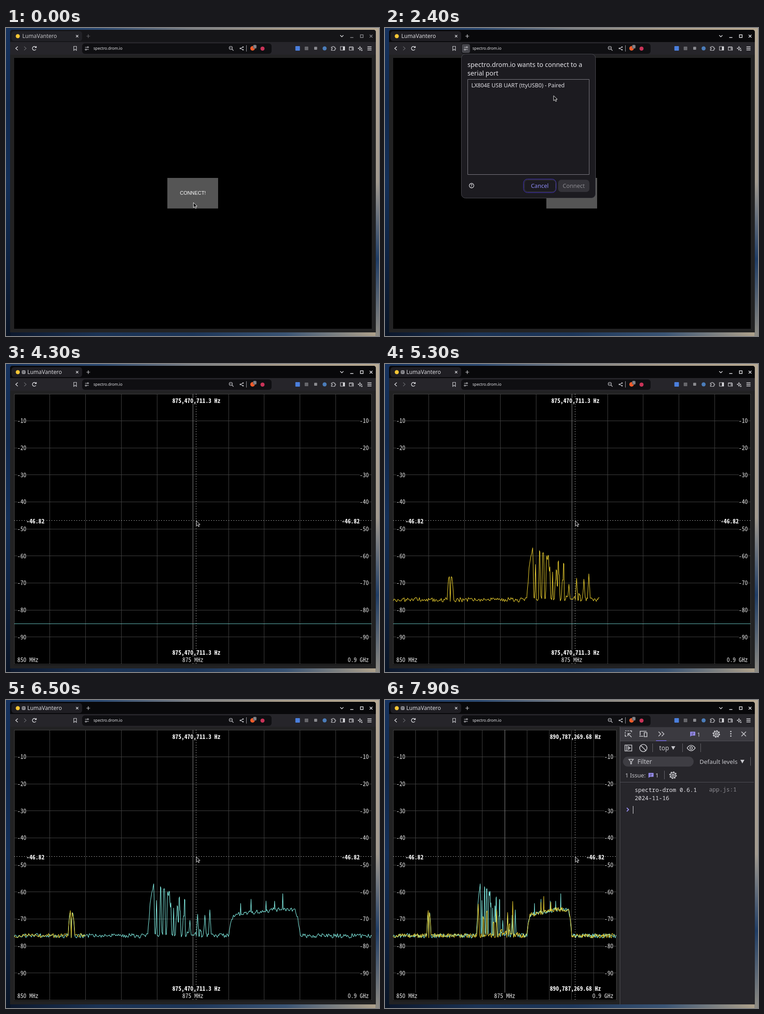
Animation of 823 by 680 pixels, one loop 8000 ms. Source, as an HTML page with a canvas:

```html
<!DOCTYPE html>
<html lang="en">
<head>
<meta charset="utf-8">
<title>Spectrum viewer</title>
<style>
html, body { margin: 0; width: 100%; height: 100%; overflow: hidden; background: #000; }
canvas { display: block; }
</style>
</head>
<body>
<canvas width="823" height="680"></canvas>
<script>
const g = document.querySelector('canvas').getContext('2d');
const SANS = '"Noto Sans", sans-serif';
const MONO = '"Noto Sans Mono", monospace';
const PLOT = '"Noto Sans Mono CJK JP", "Noto Sans Mono", monospace';
const LOOP = 8000, FOCUS = 1000, DIALOG = 1200, PICK = 2900, PRESS = 4000, CLOSE = 4200, GRID = 4300;
const SWEEP1 = 4330, SWAP = 6010, SWEEP2 = 6150, TOOLS = 6600;
const YELLOW = '#ecd02f', CYAN = '#82f0e6', GREY = '#c7c7cc', LIGHT = '#dcdce0', VIOLET = '#9a8ff5';

// Drawing helpers
function box(x, y, w, h, fill, r = 0, edge) {
  g.beginPath();
  g.roundRect(x, y, w, h, r);
  if (fill) { g.fillStyle = fill; g.fill(); }
  if (edge) { g.strokeStyle = edge; g.lineWidth = 1; g.stroke(); }
}
function dot(x, y, r, fill) {
  g.beginPath();
  g.arc(x, y, r, 0, 7);
  g.fillStyle = fill;
  g.fill();
}
// y is the middle of the capitals
function text(s, x, y, size, color, { align = 'left', font = SANS, weight = 400, halo } = {}) {
  g.font = `${weight} ${size}px ${font}`;
  g.textAlign = align;
  y += size * .36;
  if (halo) {
    g.strokeStyle = '#000';
    g.lineWidth = 3;
    g.lineJoin = 'round';
    g.strokeText(s, x, y);
  }
  g.fillStyle = color;
  g.fillText(s, x, y);
}
function icon(x, y, d, color = GREY, width = 1.2, fill) {
  g.save();
  g.translate(x, y);
  const p = new Path2D(d);
  g.strokeStyle = g.fillStyle = color;
  g.lineWidth = width;
  g.lineJoin = 'miter';
  fill ? g.fill(p) : g.stroke(p);
  g.restore();
}
const ring = r => `M${r} 0A${r} ${r} 0 1 1 ${-r} 0A${r} ${r} 0 1 1 ${r} 0`;
function line(x1, y1, x2, y2, color, dash = []) {
  g.beginPath();
  g.setLineDash(dash);
  g.moveTo(x1, y1);
  g.lineTo(x2, y2);
  g.strokeStyle = color;
  g.lineWidth = 1;
  g.stroke();
  g.setLineDash([]);
}
function gradient(x, y, w, h, colors) {
  const f = w > h ? g.createLinearGradient(0, 0, w, 0) : g.createLinearGradient(0, 0, 0, h);
  colors.forEach((c, i) => f.addColorStop(i / (colors.length - 1), c));
  g.fillStyle = f;
  g.fillRect(x, y, w, h);
}

// Spectrum model: heights above the noise floor, x in stage pixels
const FLOOR = 520.5;
const ramp = (x, a, b) => Math.min(1, Math.max(0, (x - a) / (b - a)));
const near = (x, at, reach) => Math.max(0, 1 - Math.abs(x - at) / reach);
const plateau = (x, a, b, edge) => { const k = Math.min(ramp(x, a, a + edge), ramp(x, b, b - edge)); return k * (2 - k); };
const hash = n => { const s = Math.sin(n * 127.1) * 43758.5453; return s - Math.floor(s); };

const burst = x => 53 * plateau(x, 137, 152, 6) * (1 - near(x, 144, 1.6));
const hump = x => plateau(x, 491, 650, 14) * (46 + 12 * ramp(x, 505, 595));
const chatter = (x, a, b, height) => x > a && x < b ? height * hash(x >> 2) ** 5 : 0;
function busyBlock(x) {
  if (x > 395) return 0;
  let h = plateau(x, 313, 420, 14) * (111 - 19 * ramp(x, 330, 390));
  for (const dip of [329.5, 335, 338, 345, 353.5, 367, 373, 388]) h *= 1 - Math.min(.96, 1.6 * near(x, dip, 3));
  return h * (1 - .7 * ramp(x, 356, 366) * hash(x >> 1));
}
const firstShape = x => Math.max(burst(x), hump(x), busyBlock(x), chatter(x, 397, 470, 32));
const secondShape = x => Math.max(burst(x), hump(x), 72 * near(x, 319, 5), chatter(x, 323, 470, 55));

// Peaks are pairs of place and height
function wave(shape, peaks, seed) {
  const noise = n => (hash(n + seed) - .5) * 10;
  return Array.from({ length: 790 }, (_, i) => {
    const x = i + 18, n = i >> 1;
    const h = peaks.reduce((top, [at, peak]) => Math.max(top, peak * near(x, at, 3)), shape(x));
    return FLOOR - h + (i % 2 ? (noise(n) + noise(n + 1)) / 2 : noise(n));
  });
}
const first = wave(firstShape, [[406, 30], [423, 49], [439, 45], [450, 60], [518, 72], [541, 82], [574, 79], [593, 75], [611, 96]], 11);
const second = wave(secondShape, [[384, 56], [423, 48], [441, 76], [541, 74], [551, 87], [576, 76]], 503);

function trace(data, part, width, color) {
  g.beginPath();
  const n = Math.floor(Math.min(1, part) * 789);
  for (let i = 0; i <= n; i++) g.lineTo(18 + i * width / 789, data[i]);
  g.strokeStyle = color;
  g.lineWidth = 1.1;
  g.lineJoin = 'round';
  g.stroke();
}

function wallpaper() {
  gradient(0, 0, 823, 6, ['#16315a', '#2c4a72', '#7d8084', '#a99d8a', '#b9aa92']);
  gradient(0, 670, 823, 10, ['#0c172b', '#1b3355', '#1c3558', '#3a5474', '#b3a48c']);
  gradient(0, 0, 10, 680, ['#16335f', '#10294f', '#132f58', '#0d2242', '#091425']);
  gradient(815, 0, 8, 680, ['#b7aa96', '#aca193', '#a39b90', '#1f3d66', '#8d8a82']);
}

function browser(t, dialog) {
  const active = t >= FOCUS, serial = t >= GRID;
  const ctl = active ? '#e8e8ec' : '#88888d';
  box(9, 4, 807, 668, '#222223', [5, 5, 0, 0]);
  box(9, 4, 807, 28, active ? '#08080a' : '#151518', [5, 5, 0, 0]);
  box(12, 7, 156, 22, active ? '#1f1e23' : '#212126', 6);
  box(9, 31, 807, 28, '#26252a');
  dot(26, 18, 4.5, '#f4c534');
  if (serial) {
    box(35.5, 14.5, 7, 7, null, 1, GREY);
    icon(39, 18, 'M-3 -1H3M-3 1.5H3M-1 -3V3M1.5 -3V3', GREY, .8);
  }
  text('LumaVantero', serial ? 47 : 36, 18, 12.1, active ? LIGHT : '#c2c2c6');
  icon(157, 18, 'M-2.5 -2.5L2.5 2.5M2.5 -2.5L-2.5 2.5', LIGHT);
  icon(181.5, 18, 'M-4 0H4M0 -4V4', active ? '#d0d0d4' : '#66666a');
  icon(741, 18, 'M-3.5 -2L0 1.5L3.5 -2', LIGHT, 1.5);
  icon(763, 18, 'M-3.5 3H3.5', ctl, 1.5);
  icon(785, 18, 'M-3 -3H3V3H-3Z', ctl, 1.4);
  icon(805.5, 18, 'M-3 -3L3 3M3 -3L-3 3', ctl, 1.5);

  icon(24, 45, 'M2 -4L-2.5 0L2 4', LIGHT, 1.5);
  icon(42, 45, 'M-2 -4L2.5 0L-2 4', '#65656a', 1.3);
  icon(62.5, 45, 'M3.6 2A4.2 4.2 0 1 1 3.6 -2.2M4.3 -5V-1.6H1', LIGHT, 1.4);
  icon(152.5, 45, 'M-3 -4.5H3V4.5L0 2L-3 4.5Z');
  box(168, 34, 418, 23, '#0f0f12', 6);
  if (dialog) box(169.5, 35.5, 18, 19.5, '#46464c', 4);
  icon(178.5, 45, 'M-4 -2.5H0M4 2.5H0');
  icon(180.7, 42.5, ring(1.5));
  icon(176.3, 47.5, ring(1.5));
  text('spectro.drom.io', 193, 45, 8.6, '#e4e4e8');
  icon(496, 44, ring(3.5) + 'M2.5 2.5L6 6M-1.7 0H1.7');
  icon(520, 45, 'M3 -3L-3 0L3 3');
  for (const [x, y] of [[523, 42], [517, 45], [523, 48]]) dot(x, y, 1.5, GREY);
  line(530.5, 38, 530.5, 52, '#a0a0a6');
  dot(544, 45, 5, '#f05a2a');
  box(545, 37, 8, 8.5, '#6c6c72', 3);
  text('1', 549, 41.3, 6.5, '#f0f0f2', { align: 'center' });
  dot(566, 45.5, 4.5, '#c93358');

  box(638.5, 40, 10, 10, '#4b7fdd', 1);
  box(659, 41, 8, 8, '#66666b', 1);
  box(680, 41.5, 6.5, 6.5, '#8b8b90', 1);
  dot(703, 45, 4.5, '#4b7dba');
  icon(722, 45, 'M-4 -3H-1.5A1.5 1.5 0 1 1 1.5 -3H3.5V-.8A1.5 1.5 0 1 1 3.5 2V4.5H-4V2A1.5 1.5 0 1 0 -4 -.8Z');
  icon(742.5, 45, 'M-4.5 -4H4.5V4H-4.5Z');
  box(743.5, 41, 4, 8, LIGHT);
  icon(762, 45, 'M-4.5 -3.5H3.5V-2M-4.5 -3.5V4H4.5V-2H-4.5M4.5 0H1.5V2H4.5');
  icon(781, 45, 'M0 -4L1.2 -1.2L4 0L1.2 1.2L0 4L-1.2 1.2L-4 0L-1.2 -1.2ZM4 2V6M2 4H6');
  icon(802, 45, 'M-4.5 -3.5H4.5M-4.5 0H4.5M-4.5 3.5H4.5', LIGHT, 1.4);
  g.fillStyle = '#000';
  g.fillRect(18, 66, 789, 598);
}

function portDialog(t) {
  const picked = t >= PICK;
  const connect = t >= PRESS ? '#4a30e2' : picked ? '#5440ee' : '#343339';
  g.globalAlpha = Math.min(1, (t - DIALOG + 100) / 300);
  box(168.5, 57.5, 296, 318, '#1c1b20', 9, '#4a4a50');
  text('spectro.drom.io wants to connect to a', 182, 81, 14.25, '#e6e5ea');
  text('serial port', 182, 99.5, 14.25, '#e6e5ea');
  if (picked) {
    box(182, 114, 269, 26.5, '#434469');
    line(182, 141.5, 451, 141.5, '#3a3596');
  }
  box(182.5, 113.5, 268, 210, null, 0, '#817f87');
  text('LX804E USB UART (ttyUSB0) - Paired', 190.5, 127, 12.25, '#e2e1e6');
  icon(191, 348, ring(5), LIGHT, 1.3);
  text('?', 191, 348, 8, LIGHT, { align: 'center', weight: 700 });
  if (!picked) box(305.5, 333.5, 72, 30, null, 9, '#4232c2');
  box(307.5, 335.5, 69, 26, null, 7, '#414049');
  text('Cancel', 341.5, 348, 12.6, '#8b88f4', { align: 'center' });
  box(382, 335, 69, 27, connect, 7);
  text('Connect', 416.5, 348, 12.6, picked ? '#fff' : '#8b8a90', { align: 'center' });
  g.globalAlpha = 1;
}

g.font = '100px ' + PLOT;
const digit = 6.63, plotSize = 100 * digit / g.measureText('0').width;

function plot(t) {
  const tools = t >= TOOLS;
  const w = tools ? 492 : 788.5, right = 18 + w, mid = 18 + w / 2;
  const level = db => 66 - db * 5.965;
  for (let i = 0; i <= 10; i++) {
    const x = Math.floor(18 + i * w / 10) + .5, y = Math.floor(level(-10 * i)) + .5;
    line(x, 66, x, 663, i === 5 ? '#8c8c8c' : '#424242');
    line(18, y, right, y, '#424242');
  }
  if (t < SWAP) {
    line(18, 573.5, right, 573.5, '#68c4c0');
    trace(first, (t - SWEEP1) / (SWAP - SWEEP1), w, YELLOW);
  } else {
    trace(first, 1, w, CYAN);
    trace(second, (t - SWEEP2) / 1760, w, YELLOW);
  }
  line(18, 345.5, right, 345.5, '#e8e8e8', [1.5, 4]);
  line(419.5, 66, 419.5, 663, '#e8e8e8', [1.5, 4]);

  const label = (s, x, y, align) => {
    const wide = String(s).length * digit;
    box(x - wide * { left: 0, center: .5, right: 1 }[align], y - 7, wide, 14, '#000');
    text(s, x, y, plotSize, '#ececec', { align, font: PLOT });
  };
  const reading = (s, x, y, align) => text(s, x, y, plotSize, '#fff', { align, weight: 700, font: PLOT, halo: true });
  for (let db = -10; db >= -90; db -= 10) {
    label(db, 25, level(db), 'left');
    label(db, right - 6, level(db), 'right');
  }
  label('850 MHz', 25, 653, 'left');
  label('875 MHz', mid, 653, 'center');
  label('0.9 GHz', right - 6, 653, 'right');
  reading('-46.82', 45, 347, 'left');
  reading('-46.82', right - 26, 347, 'right');
  const hz = tools ? '890,787,269.68 Hz' : '875,470,711.3 Hz';
  reading(hz, 420, 81, 'center');
  reading(hz, 420, 637.5, 'center');
}

function gear(x, y) {
  icon(x, y, ring(5.8) + ring(2.4), GREY, 1.7);
  g.setLineDash([2.9, 2.75]);
  icon(x, y, ring(7.2), GREY, 2.2);
  g.setLineDash([]);
}
function issue(x, y) {
  icon(x, y, 'M-5.5 -5H5.5V3.5H-2.5L-5.5 6Z', VIOLET, 1, true);
  icon(x, y, 'M-3 -2H3M-3 1H1.5', '#29282e', 1.2);
}
function tools(t) {
  const bar = (x, y) => line(x + .5, y - 10, x + .5, y + 9, '#68676d');
  const down = (x, y) => icon(x, y, 'M-4.5 -4H4.5L0 4Z', GREY, 1, true);
  box(511, 59, 305, 613, '#222223');
  box(518, 59, 298, 613, '#27262b');
  box(518, 60, 296, 30, '#3b3a40');
  line(518.5, 59, 518.5, 672, '#515057');
  line(518, 90.5, 814, 90.5, '#515057');
  icon(537, 75, 'M-7 -7H-4M-2 -7H1M3 -7H7V-4M-7 -4V-1M-7 1V5H-4M-1 -1L7 7M-1 5V-1H5', GREY, 1.6);
  icon(570, 75, 'M-7 3V-6H7M-9 5H0M2 -3H8V6H2Z', GREY, 1.7);
  icon(609.5, 75, 'M-6 -5L-1 0L-6 5M1 -5L6 0L1 5', GREY, 1.6);
  box(598, 89, 23, 1.5, '#7669ea');
  issue(679, 75);
  text('1', 688.5, 76, 13, GREY);
  gear(731, 75);
  for (const y of [69.5, 74.5, 79.5]) dot(763, y, 1.6, GREY);
  icon(791.5, 75, 'M-5 -5L5 5M5 -5L-5 5', GREY, 1.7);

  icon(537, 106, 'M-7.5 -6.5H7.5V6.5H-7.5ZM-3.5 -6V6M0 -3L4 0L0 3Z', GREY, 1.6);
  icon(570, 106, ring(8) + 'M-5.5 -5.5L5.5 5.5', GREY, 1.7);
  bar(590, 106);
  text('top', 605, 106, 13.6, GREY);
  down(636, 106);
  bar(656, 106);
  icon(675.5, 106, 'M-9 0Q0 -12 9 0Q0 12 -9 0' + ring(2.8), GREY, 1.7);
  bar(696, 106);

  box(525, 125, 156, 22, '#3e3d43', 11);
  icon(543, 136, 'M-5 -5H5L1 0V5H-1V0Z', GREY, 1.4);
  text('Filter', 557, 136, 13.5, GREY);
  text('Default levels', 694, 136, 13.3, GREY);
  down(788.5, 136);
  bar(806, 136);
  text('1 Issue:', 530, 166, 12.6, GREY);
  issue(587, 166);
  text('1', 596.5, 166, 13, GREY);
  bar(616, 166);
  gear(635.5, 166);
  line(518, 181.5, 814, 181.5, '#515057');

  const mono = (s, x, y, color) => text(s, x, y, 12.7, color, { font: MONO });
  mono('spectro-drom 0.6.1', 551, 198, '#e4e3e8');
  mono('2024-11-16', 551, 216, '#e4e3e8');
  mono('app.js:1', 715, 197, '#8d8c92');
  icon(535.5, 242, 'M-2 -4L2 0L-2 4', VIOLET, 1.8);
  if ((t - TOOLS) % 1000 < 500) line(547.5, 234, 547.5, 251, '#e4e3e8');
}

function pointer(t) {
  let x = 413, y = 385;
  const glide = (from, to, toX, toY) => {
    const k = ramp(t, from, to), e = k * k * (3 - 2 * k);
    x += (toX - x) * e;
    y += (toY - y) * e;
  };
  glide(1900, 2400, 371.5, 149);
  glide(2500, 2700, 377, 119);
  glide(3000, 3900, 419.5, 346);
  const arrow = 'M.5 .5V11.5L3.2 9.2L5 13.2L7 12.3L5.2 8.4H8.7Z';
  icon(x, y, arrow, '#08080a', 1, true);
  icon(x, y, arrow, '#f0f0f0', 1);
}

function draw() {
  const t = Math.floor(performance.now() % LOOP / 100) * 100;
  const dialog = t >= DIALOG && t < CLOSE;
  wallpaper();
  browser(t, dialog);
  if (t < GRID) {
    box(356, 331, 112, 67.5, '#555');
    text('CONNECT!', 412.3, 364.5, 10.95, '#fff', { align: 'center', font: '"Liberation Sans", sans-serif' });
  } else plot(t);
  if (dialog) portDialog(t);
  if (t >= TOOLS) tools(t);
  pointer(t);
  requestAnimationFrame(draw);
}
draw();
</script>
</body>
</html>
```
